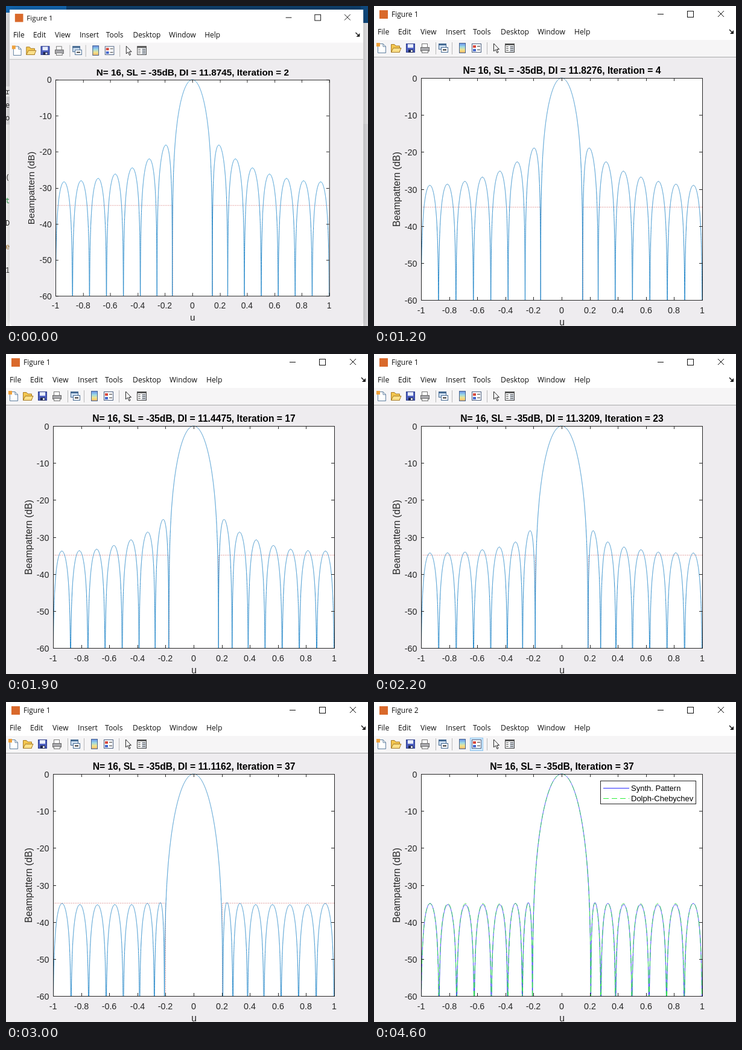
Animation of 600 by 529 pixels, one loop 4700 ms. Source, as an HTML page with a canvas:

```html
<!DOCTYPE html>
<html lang="en">
<head>
<meta charset="utf-8">
<title>Beampattern synthesis</title>
<style>
html, body { margin: 0; width: 100%; height: 100%; overflow: hidden; background: #eeecef; }
canvas { display: block; }
</style>
</head>
<body>
<canvas id="stage" width="600" height="529"></canvas>
<script>
const ctx = document.getElementById('stage').getContext('2d');
const LOOP = 4700, STEP = 100, INK = '#262626';
const UI = '"Open Sans", "Noto Sans", sans-serif';
const PLOT = '"Liberation Sans", Arial, sans-serif';
const X0 = 78, X1 = 544, Y0 = 119, Y1 = 486;
const px = u => X0 + (u + 1) / 2 * (X1 - X0);
const py = db => Y0 - db / 60 * (Y1 - Y0);

// iteration, directivity, depth of the seven side lobes in dB
const KEYS = [
  [2, 11.8745, 18.15, 22, 24.5, 26.2, 27.4, 28.05, 28.35],
  [4, 11.8276, 18.95, 22.7, 25.2, 26.8, 27.95, 28.7, 29],
  [17, 11.4475, 25.3, 28.7, 30.8, 32.3, 33.3, 33.7, 33.8],
  [30, 11.1731, 31.9, 34.5, 35, 34.8, 35, 34.95, 34.95],
  [37, 11.1162, 34.8, 35, 35.3, 35.3, 35.35, 35.3, 35]
];

function stateAt(it) {
  const i = Math.max(1, KEYS.findIndex(k => k[0] >= it));
  const a = KEYS[i - 1], b = KEYS[i], f = (it - a[0]) / (b[0] - a[0]);
  const [, di, ...lobes] = a.map((v, j) => v + (b[j] - v) * f);
  return { di, lobes };
}

// pattern of a 16 element array from its nulls
function beam(nulls) {
  const zeros = nulls.map(u => Math.cos(Math.PI * u));
  return u => {
    const c = Math.cos(Math.PI * u);
    const b = zeros.reduce((p, z) => p * (c - z) / (1 - z), Math.cos(Math.PI * u / 2));
    return 20 * Math.log10(Math.abs(b) + 1e-6);
  };
}

// widen or narrow each side lobe until it peaks at the wanted level
function solve(lobes) {
  const widths = lobes.map(() => 0.115), nulls = [];
  for (let n = 0; n < 250; n++) {
    for (let k = 6, u = 1; k >= 0; k--) nulls[k] = u -= widths[k];
    const db = beam(nulls);
    lobes.forEach((depth, k) => {
      let peak = -99;
      for (let j = 1; j < 16; j++) peak = Math.max(peak, db(nulls[k] + widths[k] * j / 16));
      widths[k] *= Math.exp(0.004 * (-depth - peak));
    });
  }
  return { db: beam(nulls), edge: Math.min(nulls[0], 0.2) };
}

const cache = {};
const patternAt = it => cache[it] ||= solve(stateAt(it).lobes);
const chebyshev = solve(Array(7).fill(35));

function box(x, y, w, h, fill, stroke) {
  if (fill) { ctx.fillStyle = fill; ctx.fillRect(x, y, w, h); }
  if (stroke) { ctx.strokeStyle = stroke; ctx.lineWidth = 1; ctx.strokeRect(x + .5, y + .5, w - 1, h - 1); }
}
function line(points, color, width = 1, dash = []) {
  ctx.beginPath();
  for (let i = 0; i < points.length; i += 2) ctx.lineTo(points[i], points[i + 1]);
  ctx.strokeStyle = color;
  ctx.lineWidth = width;
  ctx.setLineDash(dash);
  ctx.stroke();
  ctx.setLineDash([]);
}
function shape(points, fill, stroke) {
  ctx.beginPath();
  for (let i = 0; i < points.length; i += 2) ctx.lineTo(points[i], points[i + 1]);
  ctx.closePath();
  ctx.fillStyle = fill;
  ctx.fill();
  if (stroke) { ctx.strokeStyle = stroke; ctx.lineWidth = 1; ctx.stroke(); }
}
function text(str, x, y, font, color = INK, align = 'left') {
  ctx.font = font;
  ctx.fillStyle = color;
  ctx.textAlign = align;
  ctx.fillText(str, x, y);
}

function titleBar(name, active) {
  const c = active ? '#111' : '#999';
  box(0, 0, 602, 31, active ? '#fff' : '#fafafa');
  box(9, 7, 14, 14, '#d9692b');
  text(name, 29, 18, '12px ' + UI, c);
  line([470, 13.5, 480, 13.5], c);
  box(519, 8, 11, 11, null, c);
  line([570, 8, 580, 18], c);
  line([570, 18, 580, 8], c);
}

function menuBar() {
  box(0, 31, 602, 25, '#fff');
  const menus = { File: 6, Edit: 40, View: 77, Insert: 119, Tools: 164, Desktop: 210, Window: 271, Help: 332 };
  for (const m in menus) text(m, menus[m], 47, '12.2px ' + UI, '#111');
  line([589, 39, 593, 43], '#111', 1.4);
  shape([596, 40, 596, 46, 590, 46], '#111');
}

function toolBar(legendOn) {
  box(0, 56, 602, 28, '#f6f5f6');
  box(0, 84, 602, 1, '#a8a8aa');
  for (const x of [102, 129, 187]) box(x, 60, 1, 20, '#b9b9b9');
  // new
  shape([6.5, 62.5, 15, 62.5, 19.5, 67, 19.5, 77.5, 6.5, 77.5], '#fff', '#5f7f9f');
  line([15, 62.5, 15, 67, 19.5, 67], '#5f7f9f');
  box(4, 61, 6, 6, '#efa13c');
  // open
  shape([28.5, 76.5, 28.5, 63.5, 34, 63.5, 36, 66, 42.5, 66, 42.5, 76.5], '#f3c64f', '#a77b25');
  shape([28.5, 76.5, 32, 69.5, 45, 69.5, 42, 76.5], '#fbe08a', '#a77b25');
  // save
  box(53, 62, 15, 15, '#4d5fc0', '#2c3b88');
  box(56, 63, 9, 6, '#e8edfb');
  box(57, 72, 8, 5, '#20284f');
  box(61, 73, 3, 3, '#e8edfb');
  // print
  box(79, 62, 10, 7, '#fff', '#777');
  box(77, 68, 15, 7, '#a9a9ad', '#666');
  box(79, 73, 11, 5, '#eee', '#777');
  // link
  box(107, 62, 13, 10, '#cfe0f2', '#456a92');
  box(107, 62, 13, 3, '#456a92');
  box(111, 68, 12, 9, '#fff', '#456a92');
  line([114, 72.5, 120, 72.5], '#333', 2);
  // color bar
  const g = ctx.createLinearGradient(0, 62, 0, 78);
  ['#6b93e8', '#9bd9e6', '#f4e489', '#efac62'].forEach((c, i) => g.addColorStop(i / 3, c));
  box(141, 61, 11, 17, g, '#46618c');
  // legend
  if (legendOn) box(159, 59, 22, 22, '#cce6fb', '#8fc5ee');
  box(162, 62, 16, 15, '#fff', '#4b5f80');
  box(164, 65, 5, 4, '#d5473b');
  box(164, 71, 5, 4, '#4467cc');
  box(171, 66, 5, 1, '#333');
  box(171, 72, 5, 1, '#333');
  // pointer
  shape([198.5, 62, 198.5, 75, 201.5, 72, 204, 77.5, 206, 76.5, 203.5, 71.5, 207.5, 71.5], '#fff', '#222');
  // inspector
  box(217, 62, 16, 15, '#fff', '#444');
  box(217, 62, 16, 3, '#555');
  box(225, 66, 7, 10, '#cdd4dd');
  for (const y of [67, 70, 73]) { box(219, y, 4, 1, '#555'); box(226, y, 5, 1, '#555'); }
}

function curve(db, color, dash) {
  const points = [];
  for (let i = -5000; i <= 5000; i++) points.push(px(i / 5000), py(Math.max(-65, db(i / 5000))));
  line(points, color, 1, dash);
}

function axes(title, drawCurves) {
  box(0, 85, 602, 453, '#eeecef');
  box(X0, Y0, X1 - X0, Y1 - Y0, '#fff');
  ctx.save();
  ctx.beginPath();
  ctx.rect(X0, Y0 - 1, X1 - X0, Y1 - Y0 + 1);
  ctx.clip();
  drawCurves();
  ctx.restore();
  box(X0, Y0, X1 - X0 + 1, Y1 - Y0 + 1, null, INK);
  const font = '14.3px ' + PLOT, big = '15.7px ' + PLOT;
  for (let i = 0; i <= 10; i++) {
    const x = Math.round(px(i / 5 - 1)) + .5;
    line([x, Y0, x, Y0 + 5], INK);
    line([x, Y1, x, Y1 - 5], INK);
    text(String((i - 5) / 5), x - .5, 507.5, font, INK, 'center');
  }
  for (let db = 0; db >= -60; db -= 10) {
    const y = Math.round(py(db)) + .5;
    line([X0, y, X0 + 5, y], INK);
    line([X1, y, X1 - 5, y], INK);
    text(String(db), 71.5, y + 5, font, INK, 'right');
  }
  text(title, 311.5, 112, 'bold ' + big, '#000', 'center');
  text('u', 311.5, 528, big, INK, 'center');
  ctx.save();
  ctx.translate(42.5, 303);
  ctx.rotate(-Math.PI / 2);
  text('Beampattern (dB)', 0, 0, big, INK, 'center');
  ctx.restore();
}

function figureOne(it, active) {
  const { db, edge } = patternAt(it);
  titleBar('Figure 1', active);
  menuBar();
  toolBar(false);
  axes(`N= 16, SL = -35dB, DI = ${stateAt(it).di.toFixed(4)}, Iteration = ${it}`, () => {
    const y = Math.round(py(-35)) - .5;
    for (const s of [-1, 1]) {
      const x = Math.round(px(s * edge)) + .5;
      line([px(s), y, x, y, x, Y1], '#d98080', 1, [1.3, 1.7]);
    }
    curve(db, '#2b8bcb');
  });
}

function figureTwo(age, complete) {
  titleBar('Figure 2', true);
  if (age === 0) return box(0, 31, 602, 507, '#fff');
  menuBar();
  toolBar(complete);
  axes('N= 16, SL = -35dB, Iteration = 37', () => {
    curve(patternAt(37).db, '#2a2aff');
    if (complete) curve(chebyshev.db, '#2df03c', [9, 5]);
  });
  if (!complete) return;
  box(375, 130, 159, 39, '#fff', INK);
  line([380, 142.5, 423, 142.5], '#2a2aff');
  line([380, 159.5, 423, 159.5], '#2df03c', 1, [9, 5]);
  text('Synth. Pattern', 426, 147, '13px ' + PLOT, '#000');
  text('Dolph-Chebychev', 426, 164, '13px ' + PLOT, '#000');
}

// a window grows into place and fades in over a few steps
function openWindow(age, draw) {
  ctx.save();
  if (age < 3) {
    const s = 1 - 0.132 * 0.2 ** age;
    ctx.translate(230, 228);
    ctx.scale(s, s);
    ctx.translate(-230, -228);
    ctx.globalAlpha = age === 0 ? 0.2 : 1;
    ctx.shadowColor = 'rgba(0,0,0,.3)';
    ctx.shadowBlur = 14;
    if (age > 0) box(0, 0, 602, 538, '#fff');
    ctx.shadowColor = 'transparent';
    ctx.beginPath();
    ctx.roundRect(0, 0, 602, 538, 8);
    ctx.clip();
  }
  draw();
  ctx.restore();
}

function desktop() {
  box(0, 0, 600, 529, '#e9e8ea');
  box(0, 0, 100, 11, '#1268b3');
  box(100, 0, 500, 11, '#0d416f');
  box(588, 0, 12, 28, '#0f4a80');
  box(0, 133, 20, 17, '#fff');
  box(0, 196, 20, 333, '#fff');
  box(588, 195, 12, 334, '#dedde0');
  const bits = [['re', 146], ['er', 168], ['o', 189], ['(I', 287], ['t:', 326, '#2a9a4a'],
    ['D\'', 363], ['er', 402, '#b0803a'], ['1(', 441]];
  for (const [s, y, c] of bits) text(s, -1, y, '12px "Noto Sans Mono", monospace', c);
}

function iterationAt(step) {
  if (step < 12) return 2;
  return step > 28 ? 37 : Math.floor(4.5 + 13 * (step - 12) / 7);
}

function render(step) {
  desktop();
  openWindow(step + 1, () => figureOne(iterationAt(step), step < 38));
  if (step >= 40) openWindow(step - 40, () => figureTwo(step - 40, step >= 46));
}

let shown = -1;
function tick() {
  const step = Math.floor(performance.now() % LOOP / STEP);
  if (step !== shown) render(shown = step);
  requestAnimationFrame(tick);
}
tick();
</script>
</body>
</html>
```
